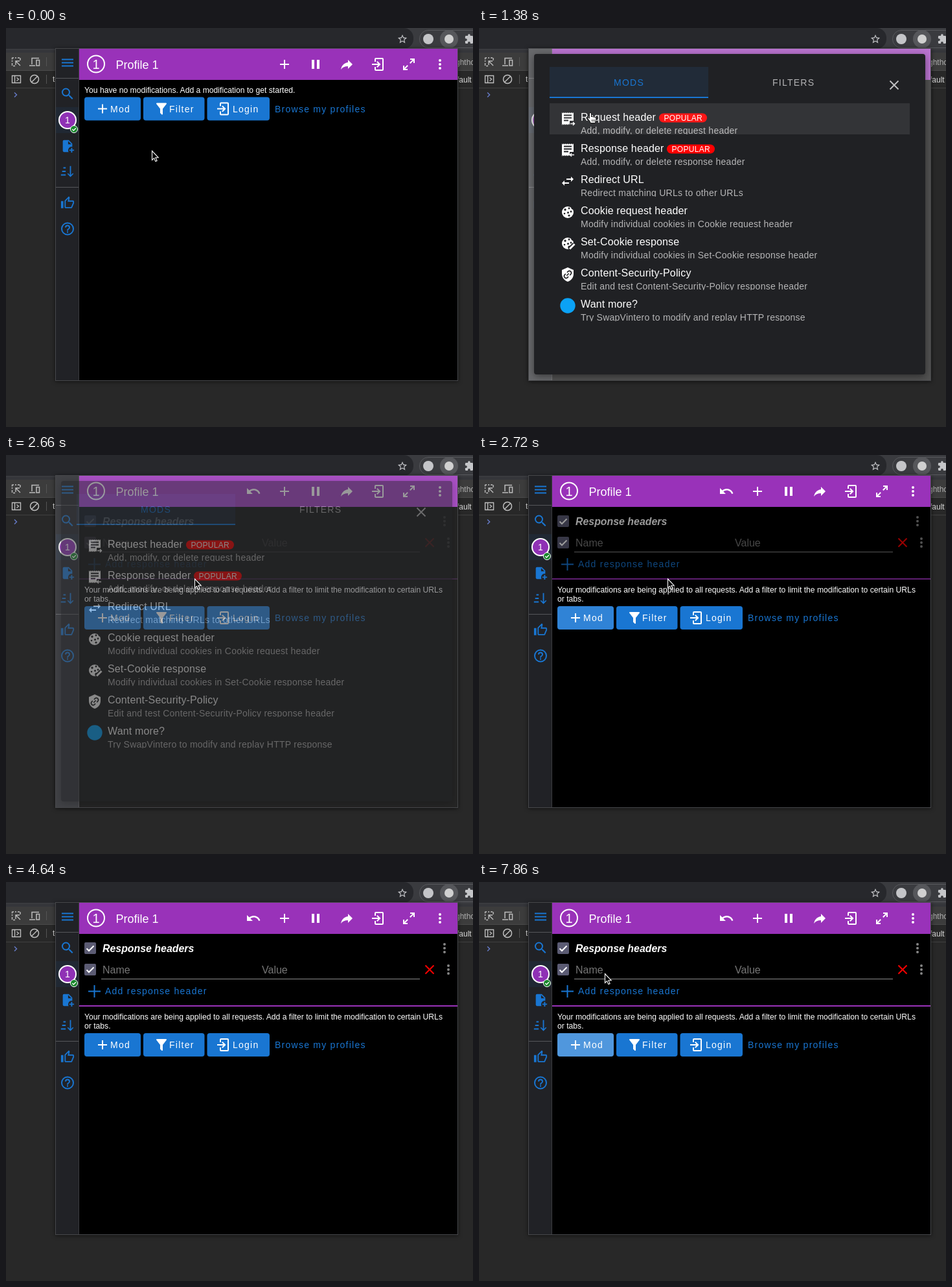
Write an HTML page that moves like this. It is 721 px wide and 615 px high and loops after 8000 ms.

```html
<!DOCTYPE html>
<html lang="en">
<head>
<meta charset="utf-8">
<title>Header extension demo</title>
<style>
html, body { margin: 0; width: 100%; height: 100%; overflow: hidden; background: #282828; }
svg { display: block; }
text { font-family: "Liberation Sans", Arial, sans-serif; white-space: pre; }
.window { filter: drop-shadow(0 1px 3px rgba(0,0,0,.6)); }
</style>
</head>
<body>
<svg id="stage" width="721" height="615" viewBox="0 0 721 615"></svg>
<script>
const LOOP = 8000;
const BLUE = '#1976d2', PURPLE = '#9932b9', PANEL = '#202124';

const PATHS = {
  search: 'M15.5 14h-.79l-.28-.27A6.47 6.47 0 0 0 16 9.5 6.5 6.5 0 1 0 9.5 16c1.61 0 3.09-.59 4.23-1.57l.27.28v.79l5 4.99L20.49 19zM9.5 14a4.5 4.5 0 1 1 0-9 4.5 4.5 0 0 1 0 9z',
  menu: 'M3 6h18v2H3zM3 11h18v2H3zM3 16h18v2H3z',
  filePlus: 'M14 2H6a2 2 0 0 0-2 2v16a2 2 0 0 0 2 2h7.81A6 6 0 0 1 13 19a6 6 0 0 1 7-5.92V8zM13 9V3.5L18.5 9zM23 20h-3v3h-2v-3h-3v-2h3v-3h2v3h3z',
  sort: 'M6 5h4v2H6zM4 11h6v2H4zM2 17h8v2H2zM17 3h2v15l3-3 1.2 1.2L18 21.5l-5.2-5.3L14 15l3 3z',
  thumb: 'M5 9v12H1V9h4m4 12a2 2 0 0 1-2-2V9c0-.55.22-1.05.59-1.41L14.17 1l1.06 1.06c.27.27.44.64.44 1.05l-.03.32L14.69 8H21a2 2 0 0 1 2 2v2c0 .26-.05.5-.14.73l-3.02 7.05C19.54 20.5 18.83 21 18 21H9m0-2h9.03L21 12v-2h-8.79l1.13-5.32L9 9.03z',
  help: 'M11 18h2v-2h-2zM12 2a10 10 0 1 0 0 20 10 10 0 0 0 0-20zm0 18a8 8 0 1 1 0-16 8 8 0 0 1 0 16zm0-14a4 4 0 0 0-4 4h2a2 2 0 1 1 4 0c0 2-3 1.75-3 5h2c0-2.25 3-2.5 3-5a4 4 0 0 0-4-4z',
  undo: 'M12.5 8c-2.65 0-5.05.99-6.9 2.6L2 7v9h9l-3.62-3.62c1.39-1.16 3.16-1.88 5.12-1.88 3.54 0 6.55 2.31 7.6 5.5l2.37-.78C21.08 11.03 17.15 8 12.5 8z',
  add: 'M19 13h-6v6h-2v-6H5v-2h6V5h2v6h6z',
  pause: 'M6 5h4v14H6zM14 5h4v14h-4z',
  share: 'M21 12l-7-7v4C7 10 4 15 3 20c2.5-3.5 6-5.1 11-5.1V19z',
  login: 'M19 2H9a2 2 0 0 0-2 2v4h2V4h10v16H9v-4H7v4a2 2 0 0 0 2 2h10a2 2 0 0 0 2-2V4a2 2 0 0 0-2-2M10.1 15.6l1.4 1.4 5-5-5-5-1.4 1.4 2.6 2.6H3v2h9.7z',
  expand: 'M10 21v-2H6.41l4.5-4.5-1.41-1.41-4.5 4.5V14H3v7h7m4.5-10.09l4.5-4.5V10h2V3h-7v2h3.59l-4.5 4.5z',
  dots: 'M12 8a2 2 0 1 0 0-4 2 2 0 0 0 0 4zm0 6a2 2 0 1 0 0-4 2 2 0 0 0 0 4zm0 6a2 2 0 1 0 0-4 2 2 0 0 0 0 4z',
  filter: 'M14 12v7.9a1 1 0 0 1-1.7.8l-2-2a1 1 0 0 1-.3-.8V12L4.2 4.6A1 1 0 0 1 5 3h14a1 1 0 0 1 .8 1.6z',
  swap: 'M21 9l-4-4v3h-7v2h7v3zM7 11l-4 4 4 4v-3h7v-2H7z',
  shield: 'M12 1L3 5v6c0 5.55 3.84 10.74 9 12 5.16-1.26 9-6.45 9-12V5z',
  star: 'M12 17.3l6.2 3.7-1.6-7L22 9.2l-7.2-.6L12 2 9.2 8.6 2 9.2 7.4 14l-1.6 7zM12 15.4l-3.8 2.3 1-4.3-3.3-2.9 4.4-.4L12 6.1l1.7 4 4.4.4-3.3 2.9 1 4.3z',
  puzzle: 'M20.5 11H19V7a2 2 0 0 0-2-2h-4V3.5a2.5 2.5 0 0 0-5 0V5H4a2 2 0 0 0-2 2v3.8h1.5a2.7 2.7 0 0 1 0 5.4H2V20a2 2 0 0 0 2 2h3.8v-1.5a2.7 2.7 0 0 1 5.4 0V22H17a2 2 0 0 0 2-2v-4h1.5a2.5 2.5 0 0 0 0-5z'
};

const rect = (x, y, w, h, fill, extra = '') =>
  `<rect x="${x}" y="${y}" width="${w}" height="${h}" fill="${fill}" ${extra}/>`;
const circle = (x, y, r, fill, extra = '') =>
  `<circle cx="${x}" cy="${y}" r="${r}" fill="${fill}" ${extra}/>`;
const line = (d, color, width = 1, extra = '') =>
  `<path d="${d}" fill="none" stroke="${color}" stroke-width="${width}" ${extra}/>`;
const text = (x, y, str, size, fill, spacing = 0, extra = '') =>
  `<text x="${x}" y="${y}" font-size="${size}" fill="${fill}" letter-spacing="${spacing}" ${extra}>${str}</text>`;
const icon = (name, cx, cy, fill = '#fff', size = 24) =>
  `<path transform="translate(${cx - size / 2} ${cy - size / 2}) scale(${size / 24})" d="${PATHS[name]}" fill="${fill}"/>`;
const group = (id, body, extra = '') => `<g id="${id}" ${extra}>${body}</g>`;
const centred = 'text-anchor="middle"';

function browser() {
  const grey = '#c4c5c8', tool = '#bdbdbd';
  return rect(0, 0, 721, 38, '#3a3b3f') +
    rect(-30, 0, 659, 32, '#27282c', 'rx="15"') + rect(0, 0, 600, 14, '#27282c') +
    rect(0, 34, 721, 4, '#35363a') +
    icon('star', 612, 17, grey, 17) +
    rect(638.5, 3.5, 110, 27, 'none', 'rx="13.5" stroke="#58595d"') +
    circle(652, 17, 8, '#c4c5c8') +
    circle(684, 17, 14, '#56575b') + circle(684, 17, 7, '#d0d0d0') +
    icon('puzzle', 716, 17, grey, 17) +
    rect(0, 38, 721, 27, '#3c3c3c') + rect(0, 65, 721, 1, '#4a4a4a') +
    rect(0, 66, 721, 26, '#282828') + rect(0, 92, 721, 1, '#404040') +
    line('M10 46h2M14 46h2M18 46h3M9.5 45.5v3M9.5 50v2M9.5 54v4M11 58.5h3M22 46v4M15 51l7 7M15 57v-6h6', tool, 1.4) +
    line('M40 56V46.5h11M36 58h9M47 49.5h4.5v8.5H47z', tool, 1.5) +
    line('M62.5 45v14M62.5 72v14', '#555') +
    line('M9.5 73.5h13v11h-13zM13.5 73.5v11M16.5 76.5l3 2.5-3 2.5', tool, 1.4) +
    circle(44, 79, 6.5, 'none', `stroke="${tool}" stroke-width="1.5"`) +
    line('M39.5 83.5l9-9', tool, 1.5) +
    text(72, 83, 'top', 12, '#e0e0e0') +
    text(694, 57, 'ghthouse', 12, '#b0b0b0') +
    text(696, 84, 'fault', 12, '#d8d8d8') +
    line('M13 99.5l3.5 3.5-3.5 3.5', '#6479c4', 1.5);
}

function sidebar() {
  return rect(77, 32, 36, 511, '#212226') + rect(77, 122, 35, 40, '#202833') +
    rect(77, 77, 36, 1, '#55565a') + rect(77, 245, 36, 1, '#55565a') + rect(112, 32, 1, 511, '#3a3b3e') +
    icon('menu', 95, 53.5, BLUE) + icon('search', 95, 101.5, BLUE) +
    circle(95, 142, 13, '#8f31b5', 'stroke="#fff" stroke-width="2"') +
    text(95, 147, '1', 14, '#fff', 0, centred) +
    circle(105, 156, 5.5, '#17862b', 'stroke="#fff"') +
    line('M102.3 156l2 2 3.6-3.8', '#fff', 1.3) +
    icon('filePlus', 95, 182, BLUE, 22) + icon('sort', 94, 221, BLUE, 22) +
    icon('thumb', 95, 269.5, BLUE, 22) + icon('help', 95, 309.5, BLUE);
}

function header() {
  const tools = ['add', 'pause', 'share', 'login', 'expand', 'dots'];
  return rect(113, 32, 584, 48, PURPLE) +
    circle(139, 55.5, 13, 'none', 'stroke="#fff" stroke-width="2"') +
    text(139, 62.5, '1', 20, '#fff', 0, centred) +
    text(169.5, 62.5, 'Profile 1', 18, '#fff') +
    tools.map((name, i) => icon(name, 430 + 48 * i, 56)).join('') +
    group('undo', icon('undo', 382, 56));
}

function button(x, width, name, iconX, labelX, label, overlay = '') {
  return rect(x, 106.5, width, 36, BLUE, 'rx="4"') + overlay +
    icon(name, iconX, 124.5) + text(labelX, 129.5, label, 14, '#fff', 1.25);
}

function actions() {
  return button(121, 87, 'add', 149, 161, 'Mod', rect(121, 106.5, 87, 36, '#fff', 'rx="4" id="modGlow"')) +
    button(212, 94.5, 'filter', 240, 252, 'Filter') +
    button(310.5, 96.5, 'login', 335, 350, 'Login') +
    text(415, 129.5, 'Browse my profiles', 14, BLUE, 1.25);
}

function card() {
  const check = y => rect(121, y, 18, 18, '#5b5b73', 'rx="2"') +
    line(`M124.5 ${y + 9.5}l3.5 3.5 7.5-7.5`, '#fff', 2);
  return check(93) + check(126) +
    text(149, 108, 'Response headers', 15.9, '#fff', 0, 'font-weight="bold" font-style="italic"') +
    text(149, 141, 'Name', 16, '#767676') + text(395, 141, 'Value', 16, '#767676') +
    rect(147, 149, 492, 1, '#8a8a8a') +
    line('M647.5 128.5l13 13M660.5 128.5l-13 13', '#f00', 1.9) +
    icon('dots', 677, 102, '#858585') + icon('dots', 683, 135, '#858585') +
    line('M127 168.5h19M136.5 159v19', BLUE, 2) +
    text(153, 173, 'Add response header', 14, BLUE, 1.25) +
    rect(113, 190, 584, 2, PURPLE);
}

const receipt = arrow =>
  '<path d="M128 150v-20l1.5 1.5 1.5-1.5 1.5 1.5 1.5-1.5 1.5 1.5 1.5-1.5 1.5 1.5 1.5-1.5 1.5 1.5 1.5-1.5 1.5 1.5 1.5-1.5v13h-6v6l-1.5-1-1.5 1.5-1.5-1.5-1.5 1.5-1.5-1.5-1.5 1.5-1.5-1.5z" fill="#fff"/>' +
  line('M131 134.5h12M131 138.5h12M131 142.5h7', PANEL, 1.8) +
  line('M141 147.5h6' + arrow, '#fff', 1.4);

const cookie = () => circle(137, 140, 9, '#fff') +
  [[133, 136, 1.7], [139, 134, 1.4], [132, 142, 1.3], [137.5, 140.5, 1.5], [142, 139, 1.4], [139, 145, 1.6], [145, 133, 2.6]]
    .map(([x, y, r]) => circle(x, y, r, PANEL)).join('');

const ROWS = [
  ['Request header', 'Add, modify, or delete request header', receipt('M145 145l2.5 2.5-2.5 2.5'), 278],
  ['Response header', 'Add, modify, or delete response header', receipt('M143 145l-2.5 2.5 2.5 2.5'), 290],
  ['Redirect URL', 'Redirect matching URLs to other URLs', icon('swap', 137, 140)],
  ['Cookie request header', 'Modify individual cookies in Cookie request header', cookie()],
  ['Set-Cookie response', 'Modify individual cookies in Set-Cookie response header',
    cookie() + line('M139 149l8-8', PANEL, 6) + line('M140 148.5l7.5-7.5', '#fff', 3)],
  ['Content-Security-Policy', 'Edit and test Content-Security-Policy response header',
    icon('shield', 137, 140) + `<g transform="rotate(-45 137 140)">` +
    line('M135.5 137h-2a3 3 0 0 0 0 6h2M138.5 137h2a3 3 0 0 1 0 6h-2M134.5 140h5', PANEL, 1.6) + '</g>'],
  ['Want more?', 'Try SwapVintero to modify and replay HTTP response', circle(137, 140, 11.7, '#0ba2f5')]
];

// Nested viewports clip each row's descenders.
function row([title, detail, art, badge], i) {
  const pill = badge ? rect(badge, 131.5, 74, 14, '#f00', 'rx="7"') +
    text(badge + 7.5, 142.8, 'POPULAR', 12, '#fff', .3) : '';
  return `<svg x="109" y="${116 + 48 * i}" width="556" height="48" viewBox="109 116 556 48">` +
    art + text(157, 143, title, 16, '#fff', .15) + text(157, 162.5, detail, 14, '#b6b6b7', .25) + pill +
    rect(109, 116, 556, 48, '#fff', `id="hover${i}" opacity="0"`) + '</svg>';
}

function dialog() {
  return rect(85, 40, 604, 494, PANEL, 'rx="4" style="filter:drop-shadow(0 3px 6px rgba(0,0,0,.45))"') +
    rect(109, 60, 245, 48, '#212b38') + rect(109, 106, 245, 2, BLUE) +
    text(208, 89, 'MODS', 14, BLUE, 1.25) + text(453, 89, 'FILTERS', 14, '#b4b4b6', 1.25) +
    line('M634.5 81.5l13 13M647.5 81.5l-13 13', '#c0c0c2', 1.9) +
    ROWS.map(row).join('');
}

const stage = document.getElementById('stage');
stage.innerHTML = browser() +
  rect(76.5, 31.5, 621, 512, '#000', 'class="window" stroke="#47484b"') +
  rect(113, 32, 584, 511, '#000') + sidebar() + header() +
  group('emptyNote', text(121, 99.5, 'You have no modifications. Add a modification to get started.', 12.16, '#fff')) +
  group('card', card()) +
  group('filterNote',
    text(121, 211.5, 'Your modifications are being applied to all requests. Add a filter to limit the modification to certain URLs', 12.16, '#fff') +
    text(121, 226, 'or tabs.', 12.16, '#fff')) +
  group('actions', actions()) +
  rect(77, 32, 620, 511, '#fff', 'id="scrim"') +
  group('dialog', dialog()) +
  group('arrow', '<path d="M.5.5v14l3.1-2.9 2.2 5 2.3-1-2.2-4.9h4.3z" fill="#000" stroke="#fff" stroke-width="1.1"/>') +
  group('hand', '<path d="M-1.5 2a1.5 1.5 0 0 1 3 0v5c.3-1 2.6-.9 2.8.4.5-.8 2.3-.6 2.5.6.6-.6 2-.3 2 1v2c0 2-1.2 3-1.2 5.5H.3C-.5 13.5-2.5 12-4 9.8c-1-1.6.7-2.6 1.8-1.3l.7.8z" fill="#fff" stroke="#000" stroke-width=".9"/>' +
    line('M2.5 11v3.5M4.5 11v3.5M6.5 11v3.5', '#000', .7));

const parts = {};
stage.querySelectorAll('[id]').forEach(el => parts[el.id] = el);

const ramp = (t, start, length) => Math.min(1, Math.max(0, (t - start) / length));
const smooth = p => p * p * (3 - 2 * p);
const show = (el, on) => el.setAttribute('display', on ? 'inline' : 'none');
const fade = (el, value) => el.setAttribute('opacity', value);

const CURSOR = [
  [120, 225, 189], [420, 172, 130], [1380, 172, 130], [1700, 191, 191], [2000, 191, 191], [2180, 291, 191],
  [3260, 291, 190], [3300, 330, 184], [3400, 663, 314], [6850, 394, 566], [6909, 394, 566],
  [6910, 349, 560], [7090, 349, 560], [7860, 194, 141]
];

function cursorAt(t) {
  const next = CURSOR.findIndex(key => key[0] > t);
  if (next === 0) return CURSOR[0].slice(1);
  if (next < 0) return CURSOR[CURSOR.length - 1].slice(1);
  const [t0, x0, y0] = CURSOR[next - 1], [t1, x1, y1] = CURSOR[next];
  const p = smooth(ramp(t, t0, t1 - t0));
  return [x0 + (x1 - x0) * p, y0 + (y1 - y0) * p];
}

function glowAt(t) {
  if (t < 2630) return .08 * ramp(t, 340, 60) + .24 * ramp(t, 480, 100);
  if (t < 4640) return .24 * ramp(t, 2690, 75);
  return .24 * ramp(t, 7600, 75);
}

function render(t) {
  const OPEN = 610, CLOSE = 2620, SWITCH = 2630;
  const edited = t >= SWITCH;
  show(parts.emptyNote, !edited);
  ['undo', 'card', 'filterNote'].forEach(id => show(parts[id], edited));
  fade(parts.card, ramp(t, SWITCH, 150));
  parts.actions.setAttribute('transform', `translate(0 ${edited ? 126.5 : 0})`);
  fade(parts.modGlow, glowAt(t));

  const closing = 1 - ramp(t, CLOSE, 75);
  const grow = .8 + .2 * (1 - Math.pow(1 - ramp(t, OPEN, 150), 2.4));
  show(parts.dialog, t > OPEN && closing > 0);
  fade(parts.dialog, ramp(t, OPEN, 75) * closing);
  fade(parts.scrim, .32 * ramp(t, OPEN, 150) * closing);
  parts.dialog.setAttribute('transform', `translate(387 287) scale(${grow}) translate(-387 -287)`);

  const [x, y] = cursorAt(t);
  const overList = t > 700 && t < 2640;
  fade(parts.hover0, overList && y < 164 ? .085 : 0);
  fade(parts.hover1, overList && y >= 164 ? .085 + .1 * ramp(t, 2540, 80) : 0);

  const visible = t < 3440 || t >= 6850;
  const pointing = overList || (t < 700 && y < 142);
  show(parts.arrow, visible && !pointing);
  show(parts.hand, visible && pointing);
  parts.arrow.setAttribute('transform', `translate(${x} ${y})`);
  parts.hand.setAttribute('transform', `translate(${x} ${y})`);
}

const began = performance.now();
function tick() {
  render((performance.now() - began) % LOOP);
  requestAnimationFrame(tick);
}
tick();
</script>
</body>
</html>
```
